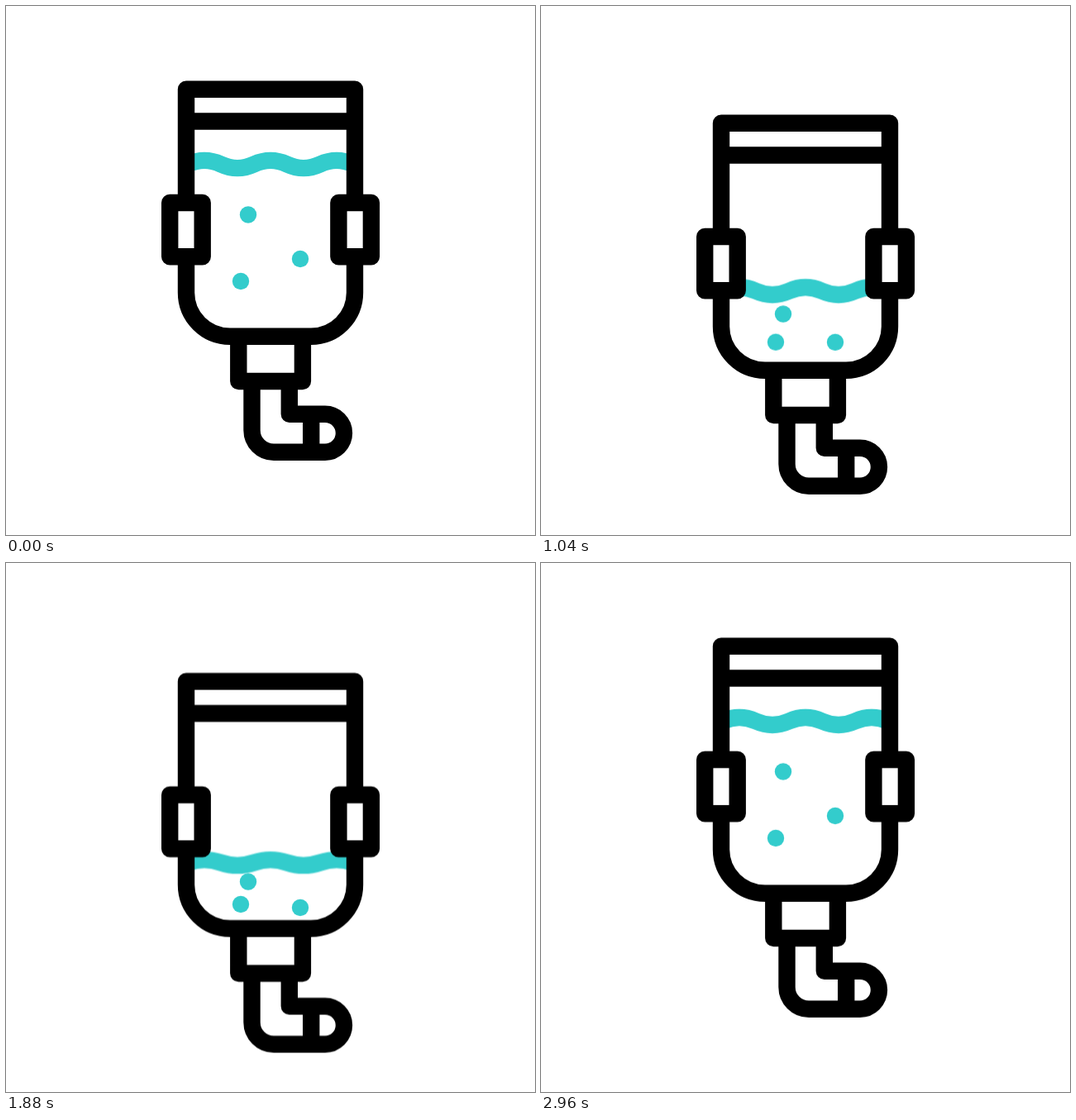
Recreate the animation shown at these times as an HTML page. Size 640x640 px, loop 3 s.

```html
<!DOCTYPE html>
<html lang="en">
<head>
<meta charset="utf-8">
<title>Drainage bag</title>
<style>
  html, body { margin: 0; width: 100%; height: 100%; overflow: hidden; background: #fff; }
  svg { display: block; width: 100%; height: 100%; }

  .line { fill: none; stroke: #000; stroke-width: 20.4; stroke-linejoin: round; }
  .clip { fill: #fff; }
  .dot { fill: #33cccc; }
  .wave { fill: none; stroke: #33cccc; stroke-width: 20.4; animation: ripple 1s ease-in-out infinite; }

  .bag { animation: bob 3s infinite; }
  .sink { animation: sink 3s infinite; }

  @keyframes bob {
    0% { transform: translateY(0); animation-timing-function: cubic-bezier(.475, 0, .476, 1); }
    53.333% { transform: translateY(51.5px); animation-timing-function: cubic-bezier(.63, 0, .37, 1); }
    82.667% { transform: translateY(-13.2px); animation-timing-function: cubic-bezier(.42, 0, .58, 1); }
    100% { transform: translateY(0); }
  }

  /* --drop is how far each part falls inside the bag */
  @keyframes sink {
    0% { transform: translateY(0); animation-timing-function: cubic-bezier(.49, 0, .34, 1); }
    53.333%, 60% { transform: translateY(var(--drop)); animation-timing-function: cubic-bezier(.5, 0, .4, 1); }
    86.667%, 100% { transform: translateY(0); }
  }

  @keyframes ripple {
    0%, 100% { d: path("M200 4.6C220 4.6 220 -4.6 240 -4.6S260 4.6 280 4.6S300 -4.6 320 -4.6S340 4.6 360 4.6S380 -4.6 400 -4.6S420 4.6 440 4.6"); }
    50% { d: path("M200 -5.8C220 -5.8 220 5.8 240 5.8S260 -5.8 280 -5.8S300 5.8 320 5.8S340 -5.8 360 -5.8S380 5.8 400 5.8S420 -5.8 440 -5.8"); }
  }
</style>
</head>
<body>
<svg viewBox="0 0 640 640">
  <clipPath id="inside"><rect x="218" y="100" width="204" height="300"/></clipPath>
  <g class="bag">
    <g clip-path="url(#inside)">
      <g class="sink" style="--drop: 130.5px">
        <g transform="translate(0 191.5)">
          <path class="wave" d="M200 4.6C220 4.6 220 -4.6 240 -4.6S260 4.6 280 4.6S300 -4.6 320 -4.6S340 4.6 360 4.6S380 -4.6 400 -4.6S420 4.6 440 4.6"/>
        </g>
      </g>
    </g>
    <circle class="dot sink" style="--drop: 92px" cx="293" cy="252.5" r="10.2"/>
    <circle class="dot sink" style="--drop: 69.5px" cx="356" cy="306" r="10.2"/>
    <circle class="dot sink" style="--drop: 38px" cx="284" cy="333" r="10.2"/>

    <g class="line">
      <!-- bag -->
      <path d="M218 100.7H422V346.8A53 53 0 0 1 369 399.8H271A53 53 0 0 1 218 346.8ZM218 139.5H422"/>
      <!-- neck and tube -->
      <path d="M281.3 399.8V454H358.9V399.8"/>
      <path d="M297.5 454V513.2A26.5 26.5 0 0 0 324 539.7H386A22.95 22.95 0 0 0 386 493.8H342.8V454M369.2 493.8V539.7"/>
      <!-- side clips -->
      <rect class="clip" x="198.2" y="238" width="39.5" height="65.3"/>
      <rect class="clip" x="402.4" y="238" width="39.5" height="65.3"/>
    </g>
  </g>
</svg>
</body>
</html>
```
